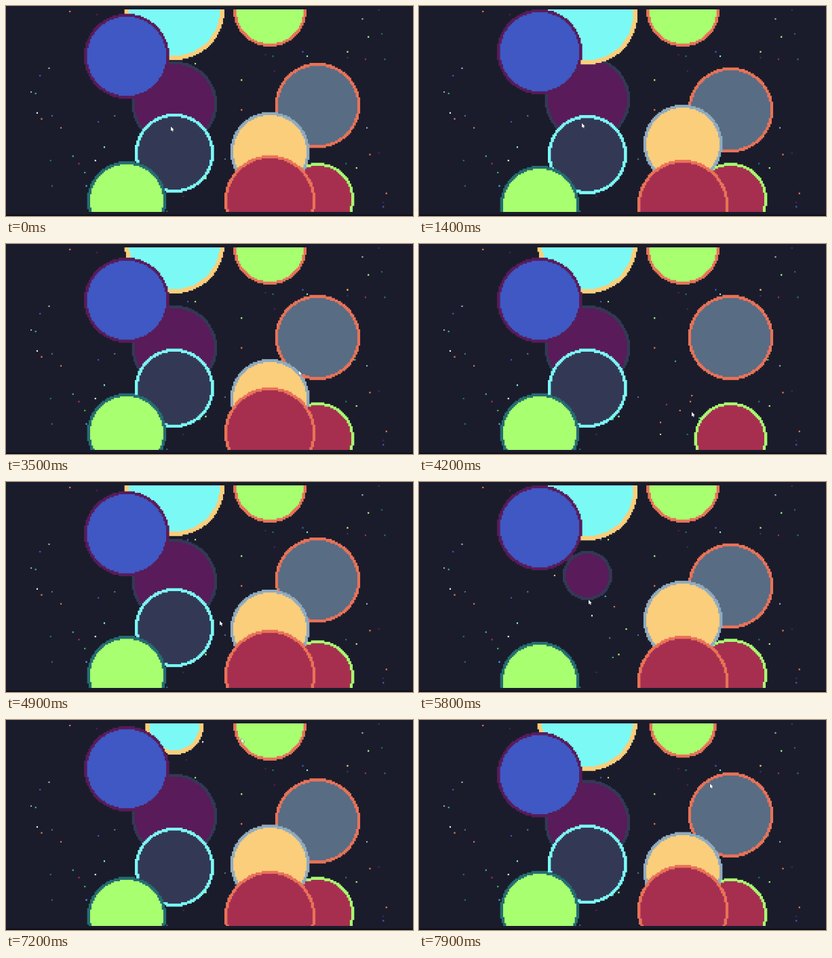
These frames come from a looping animation (600 px wide and 310 px high, 8000 ms). An HTML page with a canvas:

```html
<!DOCTYPE html>
<html lang="en">
<head>
<meta charset="utf-8">
<title>Bobbing planets</title>
<style>
html, body { margin: 0; width: 100%; height: 100%; overflow: hidden; background: #1a1c2b; }
canvas { display: block; width: 600px; height: 310px; }
</style>
</head>
<body>
<canvas id="stage" width="600" height="310"></canvas>
<script>
const ctx = document.getElementById('stage').getContext('2d');
const LOOP = 8000, STEP = 100;
const LEFT = 36, TOP = 4.9, SCALE = 2.2;
const WIDTH = 240, HEIGHT = 136, DETAIL = 4;

// Pixel-art screen, drawn large and shrunk smoothly to soften the pixel edges
const screen = document.createElement('canvas');
screen.width = WIDTH * DETAIL;
screen.height = HEIGHT * DETAIL;
const px = screen.getContext('2d');
px.scale(DETAIL, DETAIL);

const C = {
  night: '#1a1c2b', plum: '#591b59', red: '#a62f50', orange: '#ea7257',
  sand: '#fbce7b', lime: '#a8ff70', green: '#38b764', teal: '#246d72',
  blue: '#3f58c4', sky: '#41a6f6', cyan: '#7bfaf5', white: '#f4f4f4',
  mist: '#8fabc0', slate: '#586c84', navy: '#333955'
};

// Back to front; pop is the time a click bursts the planet
const planets = [
  { x: 192, y: 64, r: 28, amp: -4, fill: 'slate', rim: 'orange' },
  { x: 192, y: 128, r: 24, amp: 1, fill: 'red', rim: 'lime' },
  { x: 160, y: 0, r: 24, amp: -1, fill: 'lime', rim: 'orange', pop: 7210 },
  { x: 160, y: 96, r: 26, amp: 6, fill: 'sand', rim: 'mist', pop: 4000 },
  { x: 160, y: 128, r: 30, amp: -4, fill: 'red', rim: 'orange', pop: 4000 },
  { x: 96, y: 64, r: 28, amp: 4, fill: 'plum', rim: 'navy', pop: 5220 },
  { x: 96, y: 0, r: 33, amp: -4, fill: 'cyan', rim: 'sand', edge: 3, pop: 6560 },
  { x: 96, y: 96, r: 26, amp: -2, fill: 'navy', rim: 'cyan', pop: 5600 },
  { x: 64, y: 32, r: 28, amp: 4, fill: 'blue', rim: 'plum' },
  { x: 64, y: 128, r: 26, amp: -4, fill: 'lime', rim: 'teal' }
];
const PAUSE = 250, GROWTH = 0.05;

// Pointer stops: time, x, y
const stops = [
  [0, 243, 178], [1400, 240, 173], [2800, 461, 126], [4200, 402, 248],
  [5500, 250, 173], [5800, 250, 174], [6600, 262, 45], [7200, 347, 27],
  [7900, 429, 94]
];

function seeded(seed) {
  return () => {
    seed = (seed * 1664525 + 1013904223) % 4294967296;
    return seed / 4294967296;
  };
}

const random = seeded(7);
const hues = Object.values(C).slice(1);
const stars = Array.from({ length: 100 }, () => ({
  x: Math.floor(random() * WIDTH),
  y: Math.floor(random() * HEIGHT),
  color: hues[Math.floor(random() * hues.length)]
}));

function drawStars() {
  for (const s of stars) {
    px.fillStyle = s.color;
    px.fillRect(s.x, s.y, 1, 1);
  }
}

function disc(cx, cy, r, color) {
  px.fillStyle = color;
  for (let dy = -r; dy <= r; dy++) {
    const w = Math.floor(Math.sqrt(r * r + r - dy * dy));
    px.fillRect(cx - w, cy + dy, 2 * w + 1, 1);
  }
}

function radiusAt({ r, pop = LOOP }, t) {
  if (t < pop) return r;
  return Math.max(0, Math.min(r, Math.floor((t - pop - PAUSE) * GROWTH)));
}

function drawPlanet(p, t) {
  const r = radiusAt(p, t), edge = p.edge || 2;
  if (r < 1) return;
  const wave = Math.sin(Math.PI + 0.08 + 1.255 * t / 1000);
  const y = Math.trunc(p.y + p.amp * wave);
  disc(p.x, y, r, C[p.rim]);
  if (r > edge) disc(p.x, y, r - edge, C[p.fill]);
}

const smoother = k => k * k * k * (k * (6 * k - 15) + 10);

function pointerAt(t) {
  const next = stops.findIndex(s => s[0] > t);
  if (next < 0) return stops[stops.length - 1].slice(1);
  const [t0, x0, y0] = stops[next - 1], [t1, x1, y1] = stops[next];
  const e = smoother((t - t0) / (t1 - t0));
  return [x0 + (x1 - x0) * e, y0 + (y1 - y0) * e];
}

const arrow = new Path2D('M0 0V6.5L1.6 5.2 2.8 7.6 3.8 7 2.8 4.8H4.8Z');

function drawPointer(t) {
  ctx.save();
  ctx.translate(...pointerAt(t));
  ctx.strokeStyle = 'rgba(10, 10, 20, 0.6)';
  ctx.stroke(arrow);
  ctx.fillStyle = '#fff';
  ctx.fill(arrow);
  ctx.restore();
}

function draw(t) {
  px.fillStyle = C.night;
  px.fillRect(0, 0, WIDTH, HEIGHT);
  drawStars();
  for (const p of planets) drawPlanet(p, t);

  ctx.fillStyle = C.night;
  ctx.fillRect(0, 0, 600, 310);
  ctx.imageSmoothingQuality = 'high';
  ctx.drawImage(screen, LEFT, TOP, WIDTH * SCALE, HEIGHT * SCALE);
  ctx.fillStyle = '#0e0f17';
  ctx.fillRect(0, 308, 600, 2);
  drawPointer(t);
}

const start = performance.now();
function tick() {
  const t = (performance.now() - start) % LOOP;
  draw(Math.floor(t / STEP) * STEP);
  requestAnimationFrame(tick);
}
tick();
</script>
</body>
</html>
```
